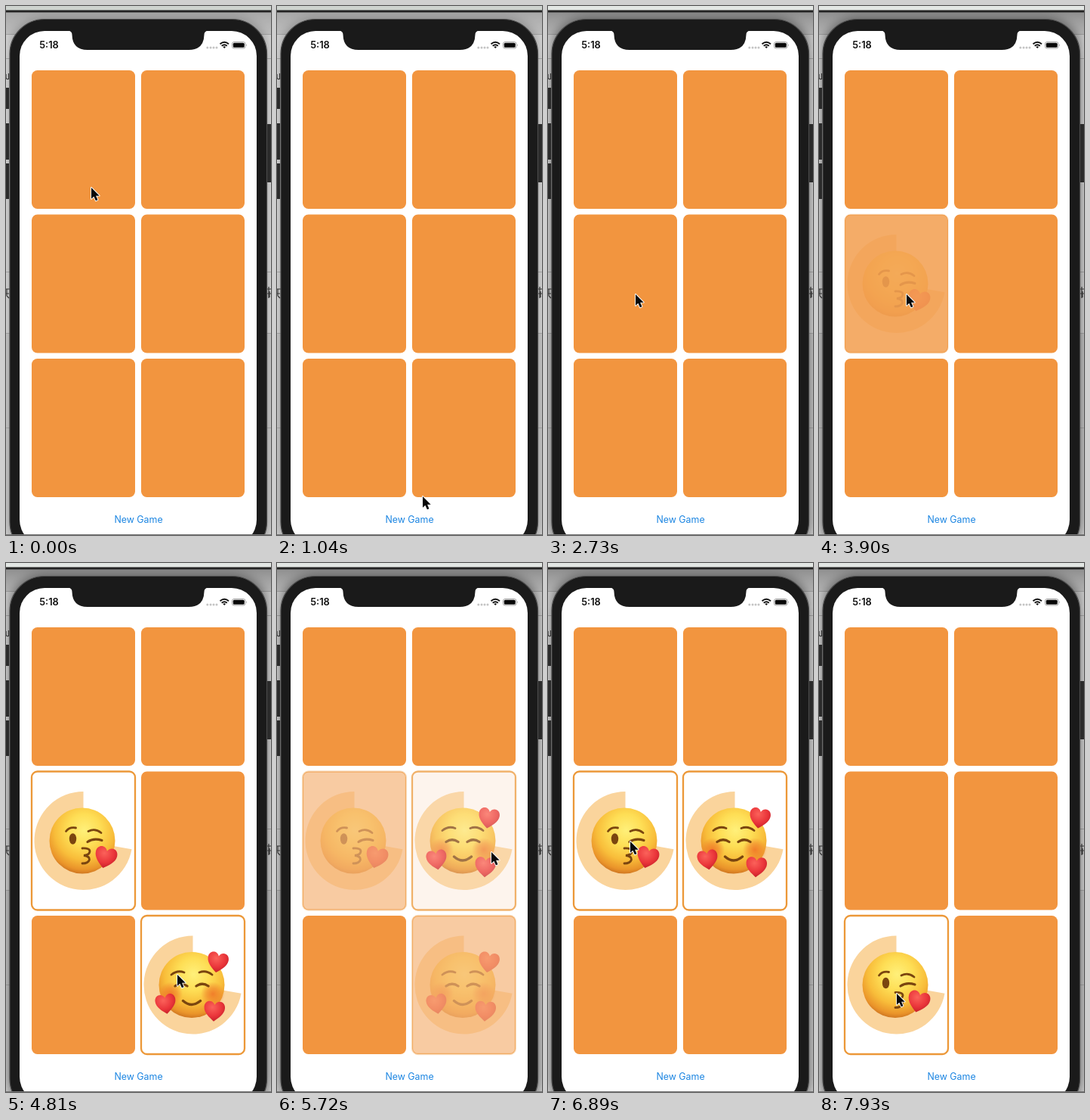
An HTML page that plays this animation: 351 px wide and 699 px high, repeating every 8000 ms.

```html
<!DOCTYPE html>
<html lang="en">
<head>
<meta charset="utf-8">
<title>Memory game</title>
<style>
html, body { margin: 0; width: 100%; height: 100%; overflow: hidden; background: #ddd; }
svg { position: absolute; left: 0; top: 0; width: 351px; height: 699px; }
text { font-family: Inter, Roboto, sans-serif; }
</style>
</head>
<body>
<svg viewBox="0 0 351 699">
  <defs>
    <filter id="blur" x="-20%" y="-20%" width="140%" height="140%"><feGaussianBlur stdDeviation="8"/></filter>
    <linearGradient id="fall" x2="0" y2="1">
      <stop offset="0" stop-opacity=".5"/>
      <stop offset="1" stop-opacity="0"/>
    </linearGradient>
    <radialGradient id="skin" cx=".53" cy=".34" r=".68">
      <stop offset="0" stop-color="#fff07a"/>
      <stop offset=".36" stop-color="#fede55"/>
      <stop offset=".66" stop-color="#f8bd3a"/>
      <stop offset=".88" stop-color="#ea942a"/>
      <stop offset="1" stop-color="#c96f1e"/>
    </radialGradient>
    <radialGradient id="blush">
      <stop offset="0" stop-color="#ef6d25" stop-opacity=".8"/>
      <stop offset=".5" stop-color="#ef7a28" stop-opacity=".55"/>
      <stop offset="1" stop-color="#ef7a28" stop-opacity="0"/>
    </radialGradient>
    <radialGradient id="red" cx=".4" cy=".3" r=".75">
      <stop offset="0" stop-color="#fb625a"/>
      <stop offset=".6" stop-color="#ea353a"/>
      <stop offset="1" stop-color="#c01d28"/>
    </radialGradient>
  </defs>

  <!-- desktop behind the phone -->
  <rect width="351" height="699" fill="#e2e2e2"/>
  <rect y="9" width="351" height="28" fill="#d0d0d0"/>
  <rect y="432" width="351" height="267" fill="#d3d3d3"/>
  <path d="M0 37.500H351M0 69.500H351M0 351.500H351M0 432.500H351M0 557.500H351" stroke="#b4b4b4"/>
  <g id="shadow">
    <rect x="5" y="17" width="341" height="710" rx="46" filter="url(#blur)"/>
    <rect y="8" width="351" height="50" fill="url(#fall)"/>
  </g>
  <rect id="bar" width="351" height="6"/>
  <rect y="5.500" width="351" height="3" fill="#232323"/>
  <path d="M0 90v4q0 3 3 2.500M3.500 89v8M0 374H5M1 374v9M0 380H4M1 383l3 3M346 374h5M348 371v15M346 380h5M349 377v8" fill="none" stroke="#333" stroke-width="1.200"/>

  <!-- phone -->
  <path d="M0 108h4v28h-4zM0 155h4v48h-4zM0 208h4v47h-4zM346 156h5v77h-5z" fill="#2b2b2b"/>
  <rect x="5" y="17.500" width="340.500" height="710" rx="46" fill="#1a1a1a" stroke="#4a4a4a" stroke-width="1.200"/>
  <rect x="18" y="33" width="314" height="679" rx="33" fill="#fff"/>
  <path d="M82 32.500Q87.500 33 87.500 38Q88 58 108 58H242Q262 58 262.500 38Q262.500 33 268 32.500Z" fill="#1a1a1a"/>

  <!-- status bar -->
  <text x="57" y="56" font-size="12.800" font-weight="600" text-anchor="middle" fill="#111">5:18</text>
  <path d="M266.800 55h.01M271 55h.01M275 55h.01M279 55h.01" stroke="#c4c4c4" stroke-width="3" stroke-linecap="round"/>
  <g fill="none" stroke="#111" stroke-width="1.800">
    <path d="M283.500 50.300Q289.200 45.300 295 50.300M285.700 52.700Q289.200 49.700 292.800 52.700"/>
    <path d="M289.200 56l-1.900-1.900q1.900-1.600 3.800 0z" fill="#111" stroke="none"/>
  </g>
  <rect x="299.500" y="47.500" width="17.500" height="8.500" rx="2.500" fill="none" stroke="#999" stroke-width=".9"/>
  <rect x="300.800" y="48.800" width="14.900" height="5.900" rx="1.500" fill="#080808"/>
  <path d="M318.200 50.300q1.600 1.400 0 2.900z" fill="#999"/>

  <text x="175.500" y="683" font-size="12.400" text-anchor="middle" fill="#1d86e2">New Game</text>
  <rect y="698" width="351" height="1" fill="#757575"/>

  <g id="cards"></g>
  <path id="arrow" d="M0 0V14.800L3.400 11.700L5.900 17.300L8.500 16.200L6.100 10.700H10.700Z" fill="#080808" stroke="#fff" stroke-width="1.800" stroke-linejoin="round" paint-order="stroke"/>
</svg>
<script>
const LOOP = 8000, STEP = 130, FADE = 380;
const ORANGE = '#f2953f', BROWN = '#7a450f';
const $ = id => document.getElementById(id);

const heart = (x, y, turn, size = 1) =>
  `<path transform="translate(${x} ${y}) rotate(${turn}) scale(${size})" fill="url(#red)"
    d="M0 15C-6 10-14.500 4-14.500-4.500C-14.500-14-3.500-16 0-8C3.500-16 14.500-14 14.500-4.500C14.500 4 6 10 0 15Z"/>`;
const lines = (d, width) =>
  `<path d="${d}" fill="none" stroke="${BROWN}" stroke-width="${width}" stroke-linecap="round"/>`;
const blush = x => `<circle cx="${x}" cy="12" r="16" fill="url(#blush)"/>`;
const head = '<circle r="43.500" fill="url(#skin)"/>';

const kiss = head +
  `<ellipse cx="-12.500" cy="-2.500" rx="4.700" ry="7.300" fill="${BROWN}"/>` +
  lines('M-21.500-12.500Q-17-18.500-8.500-17M8-12.500Q17-17 25-10.500', 2.8) +
  lines('M7 1.500Q15-4 26-.5', 3.2) +
  lines('M0 10Q10 9.500 10 14Q9.500 19 2 19.500Q10 20.500 9.500 25Q8 30 0 30', 2.8) +
  heart(31, 21.5, 14);

const love = head + blush(-28) + blush(28) +
  lines('M-27-13.500Q-19-20-10-16.500M10-16.500Q19-20 27-13.500', 2.8) +
  lines('M-22 1.500Q-14-4-6 1.500M6 1.500Q14-4 22 1.500', 3.2) +
  lines('M-11.500 21Q0 31 11.500 21', 3.4) +
  heart(34.5, -30.5, 10, .95) + heart(-34.5, 24.5, -8, .93) + heart(30, 34, 4, .95);

// a pie that stops 10 degrees below the horizontal
const end = Math.PI / 18, R = 65;
const pie = `<path fill="#fad49c" d="M68.500 91.500L${68.5 + R * Math.cos(end)} ${91.5 + R * Math.sin(end)}
  A${R} ${R} 0 1 1 68.500 ${91.5 - R}Z"/>`;

const art = ['', '', kiss, love, kiss, love];
$('cards').innerHTML = art.map((emoji, i) =>
  `<g transform="translate(${34 + i % 2 * 145} ${85 + (i >> 1) * 190.5})">
    <rect class="back" width="137" height="183" rx="7.600" fill="${ORANGE}"/>
    <g class="face"><rect width="137" height="183" rx="7.600" fill="#fff" stroke="#ec9838" stroke-width="2.300"/>
    ${pie}<g transform="translate(67 91.500)">${emoji}</g></g></g>`).join('');
const backs = document.querySelectorAll('.back');
const fronts = document.querySelectorAll('.face');

// time, card turned up, cards turned down
const taps = [
  [3820, 2, []],
  [4350, 5, []],
  [5480, 3, [2, 5]],
  [6400, 2, []],
  [7450, 4, [2, 3]]
];

// pointer moves: start, end, x, y
const moves = [
  [0, 0, 113, 240],
  [60, 780, 193, 648],
  [1040, 1690, 121, 396],
  [1880, 2210, 116, 381],
  [3960, 4330, 227, 544],
  [4830, 5450, 284, 382],
  [5990, 6380, 109, 368],
  [6900, 7430, 103, 569]
];

const ease = p => {
  p = Math.min(1, Math.max(0, p));
  return p * p * (3 - 2 * p);
};

// how far a card shows its face, 0 to 1
function shown(card, t) {
  let v = 0;
  for (const [start, up, down] of taps) {
    if (t < start) break;
    const p = ease((t - start) / FADE);
    if (up === card) v = p;
    if (down.includes(card)) v = 1 - p;
  }
  return v;
}

function pointer(t) {
  let x = 0, y = 0;
  for (const [from, to, tx, ty] of moves) {
    if (t < from) break;
    const p = to > from ? ease((t - from) / (to - from)) : 1;
    x += (tx - x) * p;
    y += (ty - y) * p;
  }
  return [x, y];
}

function draw(now) {
  const t = Math.floor(now % LOOP / STEP) * STEP;
  const focused = t >= 2470;
  $('shadow').setAttribute('opacity', focused ? .62 : .38);
  $('bar').setAttribute('fill', focused ? '#e3e7e4' : '#ced3cf');
  art.forEach((_, i) => {
    const v = shown(i, t);
    fronts[i].setAttribute('opacity', v);
    backs[i].setAttribute('opacity', 1 - v);
  });
  $('arrow').setAttribute('transform', `translate(${pointer(t).join(' ')})`);
}

const begin = performance.now();
function tick() {
  draw(performance.now() - begin);
  requestAnimationFrame(tick);
}
tick();
</script>
</body>
</html>
```
